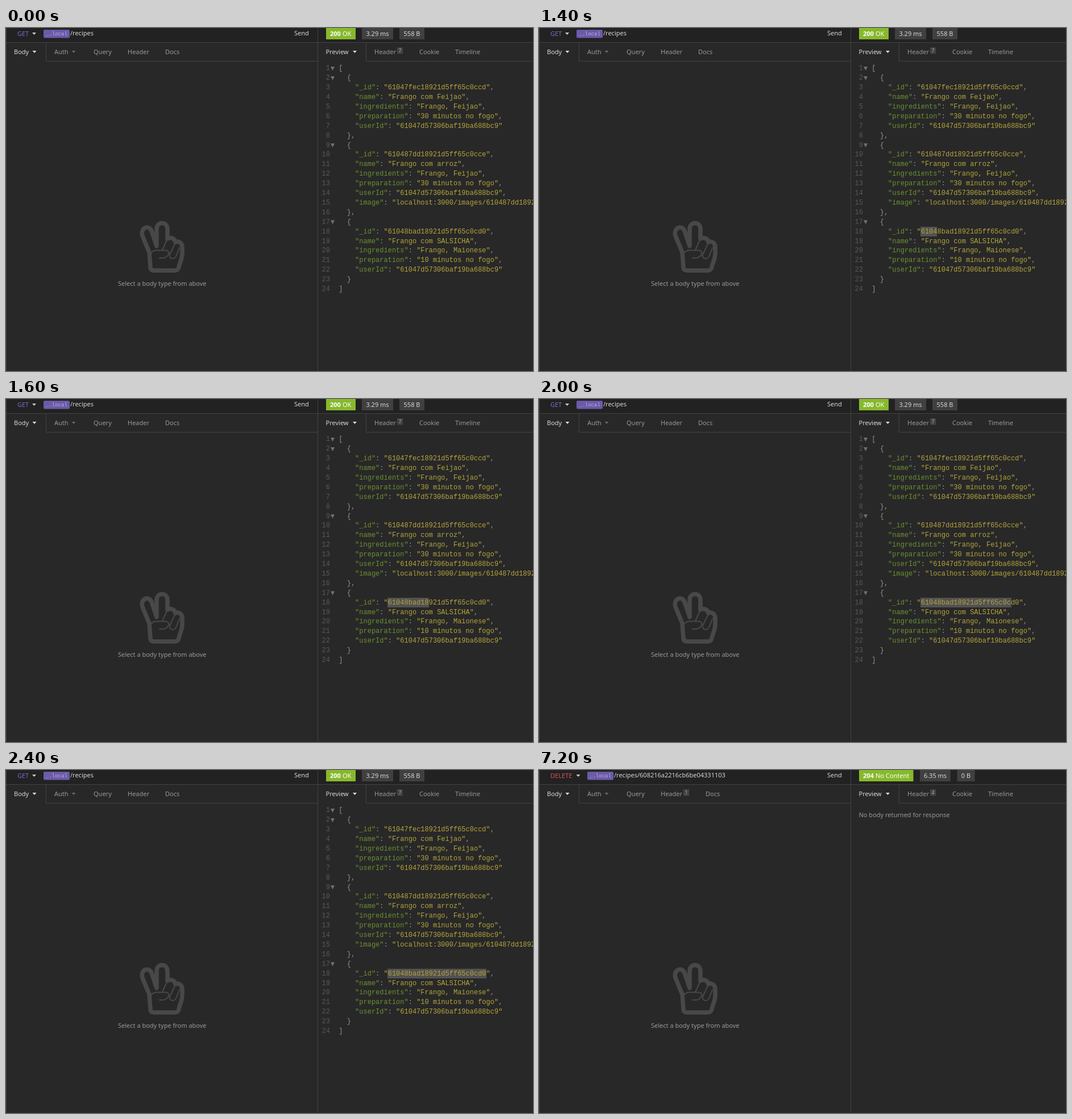
An HTML page for the animation above (8 s loop, 927x604 px).

```html
<!DOCTYPE html>
<html lang="en">
<head>
<meta charset="utf-8">
<title>REST client</title>
<style>
  html, body { margin: 0; height: 100%; overflow: hidden; background: #282828; }
  svg { display: block; width: 927px; height: 604px; }
  text { font: 11px "Noto Sans", "Open Sans", sans-serif; fill: #999; }
  .on { fill: #d6d6d6; }
  .hint { fill: #5e5e5e; }
  .bold { font-weight: 700; }
  .white { fill: #fff; }
  .small { font-size: 8px; fill: #aaa; }
  .tag { font: 9px "Liberation Mono", monospace; fill: #b9addf; }
  .code { font: 12px "Liberation Mono", monospace; fill: #929292; }
  .num { fill: #585858; text-anchor: end; }
  .key { fill: #6a9131; }
  .str { fill: #b3a43d; }
  .line { fill: none; stroke: #424242; }
  .icon { fill: none; stroke: #aaa; stroke-width: 1.2; }
  .hand { fill: none; stroke: #484848; stroke-width: 7.5; stroke-linejoin: round; stroke-linecap: round; }
</style>
</head>
<body>
<svg id="stage" viewBox="0 0 927 604"></svg>
<script>
const LOOP = 8000;
const SCENE_STARTS = [0, 5800, 7200];
const SELECT_START = 1200, SELECT_STEP = 200, SELECT_LEFT = 671;
const SELECT_EDGES = [679, 700, 744, 823, 831, 838, 845];

const text = (x, y, s, cls = '', attrs = '') => `<text x="${x}" y="${y}" class="${cls}" ${attrs}>${s}</text>`;
const rect = (x, y, w, h, fill, r = 0) => `<rect x="${x}" y="${y}" width="${w}" height="${h}" rx="${r}" fill="${fill}"/>`;
const path = (d, cls, attrs = '') => `<path d="${d}" class="${cls}" ${attrs}/>`;
const caret = (x, y, fill = '#ccc') => path(`M${x} ${y}h7l-3.5 4z`, '', `fill="${fill}"`);
const count = (x, n) => rect(x, 34, 10, 11.5, '#444', 1) + text(x + 5, 42.8, n, 'small', 'text-anchor="middle"');

function frame() {
  return rect(0, 0, 927, 25, '#222') +
    path('M0 25.5H927M.5 0V604M548.5 0V604', 'line') +
    text(507, 13, 'Send', 'on');
}

function request(method, color, caretX, tagX, url) {
  return text(20, 13.5, method, '', `style="fill:${color}"`) + caret(caretX, 8) +
    rect(tagX, 3, 46, 14.5, '#6b5aa8', 2) + text(tagX + 4, 13, '_.local', 'tag') +
    text(tagX + 47, 13, url, 'on');
}

// Each tab is [x, label, caretX, countX, count]; the first one is active.
function tabs(edge, end, list) {
  return path(`M${edge}.5 26V58.5H${end}`, 'line') + list.map(([x, label, caretX, countX, n], i) =>
    text(x, 46, label, i ? '' : 'on') +
    (caretX ? caret(caretX, 40, i ? '#666' : '#ddd') : '') +
    (n ? count(countX, n) : '')).join('');
}

function response(code, reason, reasonX, greenWidth, badges, headers) {
  return rect(563, 0, greenWidth, 20, '#87b92d') +
    text(570, 13.5, code, 'bold white') + text(reasonX, 13.5, reason, 'white') +
    badges.map(([x, w, s]) => rect(x, 0, w, 20, '#404040') +
      text(x + w / 2, 13.5, s, 'on', 'text-anchor="middle"')).join('') +
    tabs(633, 927, [[562.5, 'Preview', 610], [648, 'Header', 0, 688, headers], [727, 'Cookie'], [790, 'Timeline']]);
}

function json(data) {
  return JSON.stringify(data, null, 2).split('\n').map((line, i) => {
    const y = 74.3 + i * 16.9;
    const body = line.trim();
    const x = 585.3 + (line.length - line.trimStart().length) * 7.2;
    const colored = body.replace(/"[^"]*"(?=(:)?)/g, (s, colon) =>
      `<tspan class="${colon ? 'key' : 'str'}">${s}</tspan>`);
    const fold = /[[{]$/.test(body) ? path(`M571 ${y - 6.2}h7l-3.5 7z`, '', 'fill="#707070"') : '';
    return text(570, y, i + 1, 'code num') + fold + text(x, y, colored, 'code');
  }).join('');
}

function emptyBody() {
  return path('M254 421L252 395 240 366C236 353 250 345 256 357L265 384V354C265 340 284 340 284 354V371' +
      'C289 368 297 370 298 377C304 374 310 379 310 386V398C309 410 306 411 304 421Q303 427 297 427H261Q254 427 254 421Z', 'hand') +
    path('M253 402Q255 393 263 391.5H282Q289 394 285 400Q282 404 277 405H270M275 391L283 373' +
      'M298 378L288 399C286 407 297 409 300 400L305 387', 'hand', 'style="stroke-width:2"') +
    text(197, 453.5, 'Select a body type from above');
}

function form() {
  const teeth = Array.from({ length: 8 }, (_, i) =>
    `<path d="M17 116v2" stroke="#aaa" stroke-width="2" transform="rotate(${i * 45} 17 121)"/>`).join('');
  return path('M12 83h10M12 86.5h10M12 90h10', 'icon') + text(35, 90, 'image', 'on') +
    path('M33 100.5H249M33 134.5H249M259 134.5H472', 'line') +
    '<rect x="259.5" y="77.5" width="213" height="19" rx="3" class="line" style="stroke:#606060"/>' +
    path('M341.6 81.6h5l3.8 3.8v6.9h-8.8zM346.6 81.6v3.8h3.8', 'icon', 'style="stroke:#ddd"') +
    text(355, 90.7, 'EU.png', 'on') + caret(484.5, 84.5, '#aaa') +
    path('M513 86.5V90H504.6V82H511M506.5 85.5l2.5 2.5 5-5', 'icon') +
    path('M526.5 83.5h9M529 83v-1.5h4V83M527.6 84v6.8h6.8V84M529.8 85.5v3.8M532.2 85.5v3.8', 'icon') +
    teeth + '<circle cx="17" cy="121" r="2.7" class="icon" style="stroke-width:2.2"/>' +
    text(35, 124.6, 'New name', 'hint') + text(261, 124.6, 'New value', 'hint');
}

const recipe = (_id, name, ingredients, minutes) => ({
  _id, name, ingredients, preparation: minutes + ' minutos no fogo', userId: '61047d57306baf19ba688bc9',
});
const riceId = '610487dd18921d5ff65c0cce';
const rice = { ...recipe(riceId, 'Frango com arroz', 'Frango, Feijao', 30), image: `localhost:3000/images/${riceId}.png` };
const recipes = [
  recipe('61047fec18921d5ff65c0ccd', 'Frango com Feijao', 'Frango, Feijao', 30),
  rice,
  recipe('61048bad18921d5ff65c0cd0', 'Frango com SALSICHA', 'Frango, Maionese', 10),
];

const scenes = [
  request('GET', '#7d69cb', 46, 66, '/recipes') +
    tabs(70, 548, [[14, 'Body', 46.5], [85, 'Auth', 115.5], [154, 'Query'], [214, 'Header'], [280, 'Docs']]) +
    emptyBody() +
    response(200, 'OK', 592, 52, [[626, 55, '3.29 ms'], [692, 44, '558 B']], 7) +
    `<rect id="selection" x="${SELECT_LEFT}" y="350" height="17" fill="#525252"/>` + json(recipes),
  request('PUT', '#e5912d', 47, 66.5, `/recipes/${riceId}/image`) +
    tabs(104, 548, [[14, 'Multipart', 81.5, 65.5, 1], [120, 'Auth', 150.5], [189, 'Query'], [249, 'Header', 0, 289, 2], [328, 'Docs']]) +
    form() +
    response(200, 'OK', 592, 52, [[626, 55, '20.5 ms'], [692, 44, '224 B']], 7) + json(rice),
  request('DELETE', '#d65550', 65.5, 85, '/recipes/608216a2216cb6be04331103') +
    tabs(70, 548, [[14, 'Body', 46.5], [85, 'Auth', 115.5], [154, 'Query'], [214, 'Header', 0, 254, 1], [293, 'Docs']]) +
    emptyBody() +
    response(204, 'No Content', 592, 95.5, [[670, 54, '6.35 ms'], [735.5, 31, '0 B']], 4) +
    text(562.5, 82.5, 'No body returned for response'),
];

const stage = document.getElementById('stage');
stage.innerHTML = frame() + scenes.map(s => `<g class="scene">${s}</g>`).join('');
const groups = [...stage.querySelectorAll('.scene')];
const selection = document.getElementById('selection');
const start = performance.now();

function draw() {
  const t = (performance.now() - start) % LOOP;
  const current = SCENE_STARTS.findLastIndex(s => t >= s);
  groups.forEach((g, i) => { g.style.display = i === current ? '' : 'none'; });
  const step = Math.min(Math.floor((t - SELECT_START) / SELECT_STEP), SELECT_EDGES.length - 1);
  selection.setAttribute('width', step < 0 ? 0 : SELECT_EDGES[step] - SELECT_LEFT);
  requestAnimationFrame(draw);
}
draw();
</script>
</body>
</html>
```
